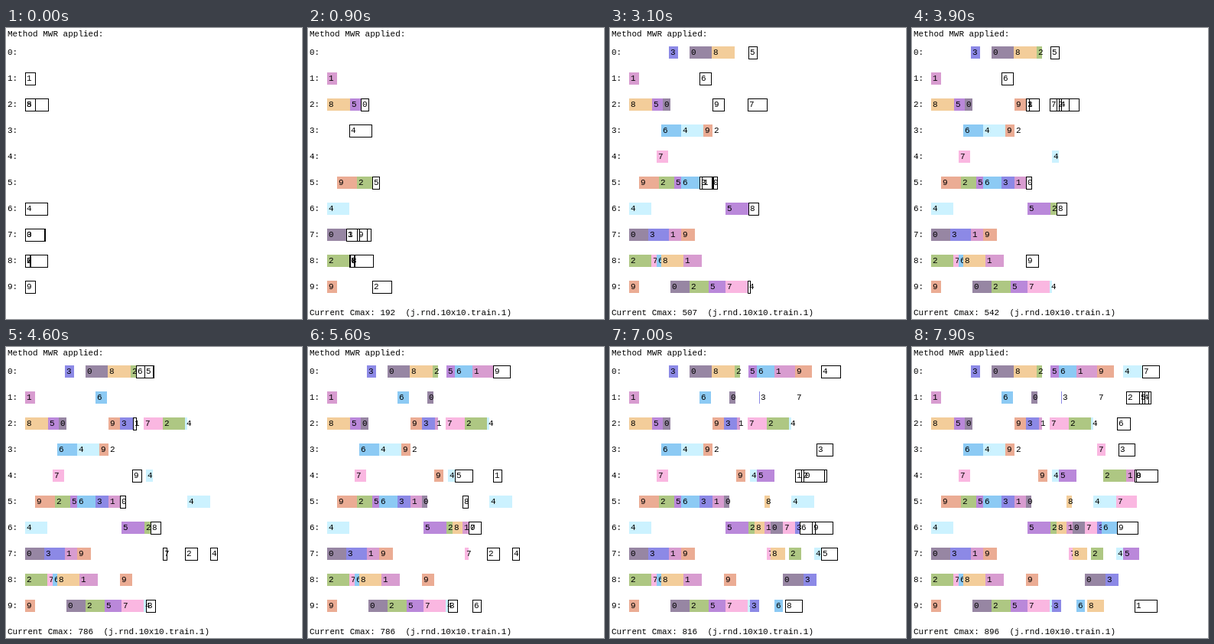
These frames come from a looping animation (387x380 px, 8 s). An HTML page with a canvas:

```html
<!DOCTYPE html>
<html lang="en">
<head>
<meta charset="utf-8">
<title>Job shop schedule</title>
<style>
html, body { margin: 0; width: 100%; height: 100%; overflow: hidden; background: #fff; }
canvas { display: block; width: 387px; height: 380px; }
</style>
</head>
<body>
<canvas id="stage"></canvas>
<script>
const W = 387, H = 380, STEP = 100, STEPS = 80;
const LEFT = 25, TOP = 24, PITCH = 34, BAR = 16, UNITS_PER_PX = 3.25;

// The problem instance: colour, machine route, time on each machine.
// A time beyond the route is the work left after the last machine shown.
const jobs = [
  ['#9786a3', '729051684', [82, 33, 82, 94, 23, 26, 51, 88, 98, 19]],
  ['#d89cd0', '178526049', [42, 53, 78, 49, 12, 28, 87, 36, 94, 44]],
  ['#aec783', '8593062741', [94, 65, 81, 1, 23, 26, 94, 52, 98, 77]],
  ['#8c89e6', '705291683', [86, 40, 55, 55, 40, 3, 20, 55, 68, 74]],
  ['#ccf2ff', '639425701', [95, 95, 9, 29, 9, 98, 30, 80, 36, 64]],
  ['#ba88da', '25960471', [43, 29, 72, 97, 35, 75, 68, 40, 64]],
  ['#8ccaf4', '83510962', [20, 84, 78, 49, 76, 35, 65, 55, 46]],
  ['#fab7e1', '8492761350', [22, 50, 94, 81, 16, 52, 1, 35, 88, 72]],
  ['#f3cd9a', '28065794', [99, 95, 97, 41, 23, 62, 72, 6, 97]],
  ['#ebac94', '957328406', [42, 85, 58, 39, 49, 52, 39, 72, 87, 68]]
].map(([color, route, times], id) => ({ id, color, route, times }));

const canvas = document.getElementById('stage');
const ctx = canvas.getContext('2d');
const ratio = window.devicePixelRatio || 1;
canvas.width = W * ratio;
canvas.height = H * ratio;

// Earliest idle slot on the machine that holds the job's next operation.
function place(job, placed) {
  const machine = +job.route[job.next], time = job.times[job.next];
  const booked = placed.filter(op => op.machine === machine)
    .sort((a, b) => a.start - b.start);
  let start = job.ready;
  for (const op of booked) {
    if (start + time <= op.start) break;
    start = Math.max(start, op.end);
  }
  return { job, machine, start, end: start + time };
}

// Most work remaining: the job with the largest remainder goes first.
function schedule(count) {
  const state = jobs.map(job => ({
    ...job, next: 0, ready: 0, left: job.times.reduce((a, b) => a + b)
  }));
  const placed = [];
  while (placed.length < count) {
    const job = state.reduce((best, j) => j.left > best.left ? j : best);
    const op = place(job, placed);
    placed.push(op);
    job.ready = op.end;
    job.left -= job.times[job.next++];
  }
  const waiting = state.filter(j => j.next < j.route.length).map(j => place(j, placed));
  return { placed, waiting };
}

const toX = t => LEFT + Math.round(t / UNITS_PER_PX);
const rowY = machine => TOP + PITCH * machine;

function text(str, x, y) {
  ctx.fillStyle = '#000';
  ctx.fillText(str, x, y);
}

function drawOp(op, done) {
  const x = toX(op.start), w = toX(op.end) - x, y = rowY(op.machine);
  if (done) {
    ctx.fillStyle = op.job.color;
    ctx.fillRect(x, y, w, BAR);
  } else if (w > 0) {
    ctx.strokeRect(x + 0.5, y + 0.5, w, BAR);
  }
  text(op.job.id, x + 2, y + 11);
}

function draw(count) {
  ctx.setTransform(ratio, 0, 0, ratio, 0, 0);
  ctx.fillStyle = '#fff';
  ctx.fillRect(0, 0, W, H);
  ctx.font = '11px "Courier New", "Liberation Mono", monospace';
  ctx.strokeStyle = '#000';
  ctx.lineWidth = 1;

  text('Method MWR applied:', 2, 11);
  for (let m = 0; m < 10; m++) text(m + ':', 2, rowY(m) + 11);

  const { placed, waiting } = schedule(count);
  placed.forEach(op => drawOp(op, true));
  waiting.forEach(op => drawOp(op, false));
  if (count) {
    const cmax = Math.max(...placed.map(op => op.end));
    text(`Current Cmax: ${cmax}  (j.rnd.10x10.train.1)`, 2, 375);
  }
}

let shown = -1;
const begin = performance.now();
function tick() {
  const count = Math.floor((performance.now() - begin) / STEP) % STEPS;
  if (count !== shown) draw(shown = count);
  requestAnimationFrame(tick);
}
tick();
</script>
</body>
</html>
```
